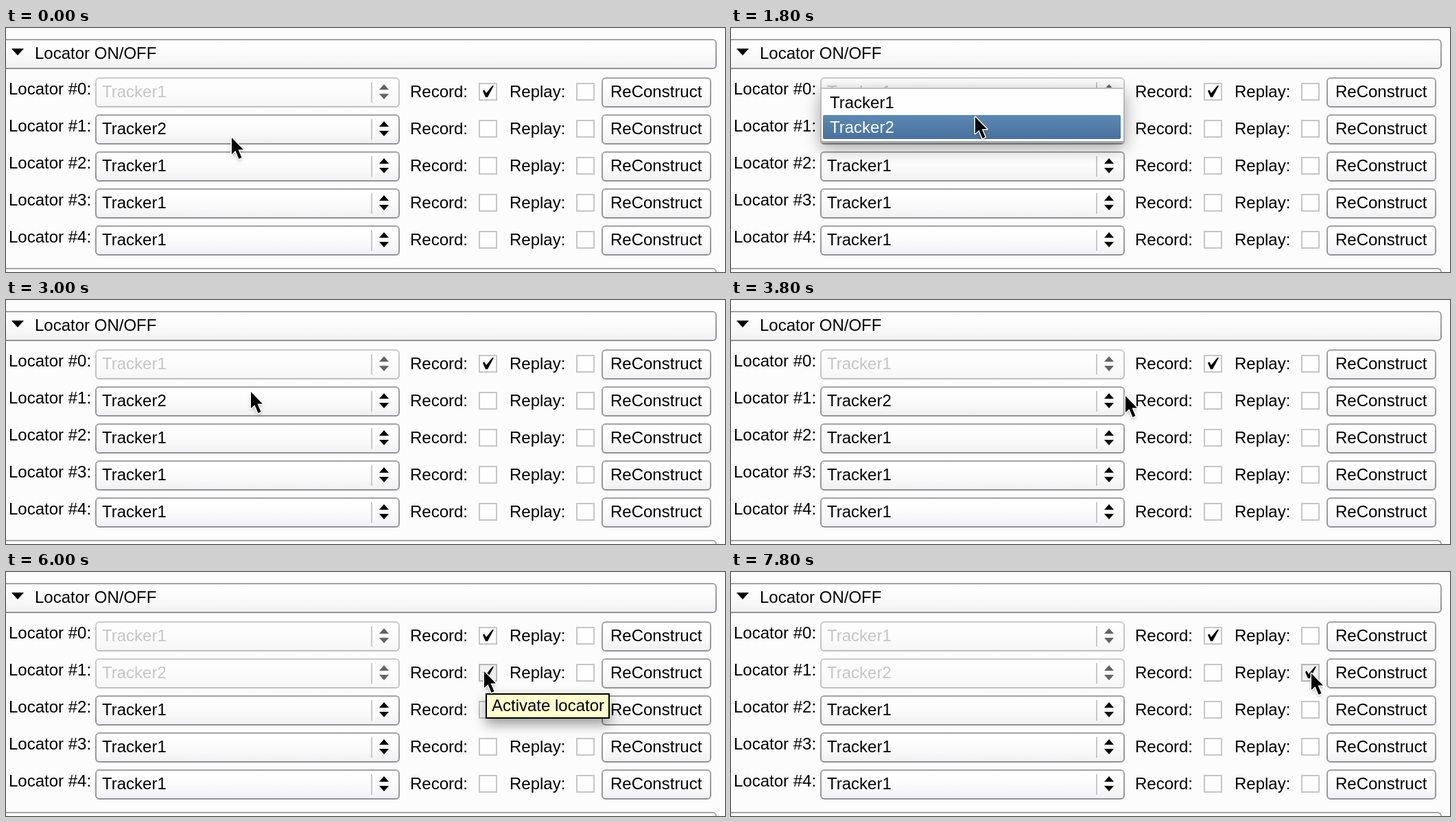
Write an HTML page with a canvas that moves like this. It is 1048 px wide and 356 px high and loops after 8000 ms.

```html
<!DOCTYPE html>
<html lang="en">
<head>
<meta charset="utf-8">
<title>Locator panel</title>
<style>
  html, body { margin: 0; width: 100%; height: 100%; overflow: hidden; background: #fcfcfc; }
  canvas { display: block; width: 100%; height: 100%; }
</style>
</head>
<body>
<canvas id="stage" width="1048" height="356"></canvas>
<script>
const ctx = document.getElementById('stage').getContext('2d');
const LOOP = 8000, STEP = 200, ROW_HEIGHT = 54;
const PAPER = '#fcfcfc';

// Pointer path: time, x, y
const path = [
  [0, 329, 160], [200, 329, 160], [800, 351, 143], [1200, 354, 138],
  [1600, 355, 135], [2200, 360, 114], [2400, 360, 114], [2800, 357, 134],
  [3200, 357, 134], [4200, 694, 144], [4800, 694, 144], [5200, 697, 145],
  [6400, 697, 145], [7400, 846, 148], [8000, 846, 148]
];

function pointerAt(time) {
  const i = Math.max(1, path.findIndex(p => p[0] >= time));
  const [t0, x0, y0] = path[i - 1], [t1, x1, y1] = path[i];
  const u = (time - t0) / (t1 - t0), ease = u * u * (3 - 2 * u);
  return { x: Math.round(x0 + (x1 - x0) * ease), y: Math.round(y0 + (y1 - y0) * ease) };
}

const between = (time, from, to) => time >= from && time < to;

function text(str, x, y, color = '#000') {
  ctx.fillStyle = color;
  ctx.fillText(str, x, y);
}

function shape(points, color) {
  ctx.beginPath();
  points.forEach(([x, y]) => ctx.lineTo(x, y));
  ctx.closePath();
  ctx.fillStyle = color;
  ctx.fill();
}

function gradient(y, h, ...colors) {
  const g = ctx.createLinearGradient(0, y, 0, y + h);
  colors.forEach((c, i) => g.addColorStop(i / (colors.length - 1), c));
  return g;
}

function withShadow(color, blur, dy, draw) {
  ctx.save();
  ctx.shadowColor = color;
  ctx.shadowBlur = blur;
  ctx.shadowOffsetY = dy;
  draw();
  ctx.restore();
}

function bevel(x, y, w, h) {
  ctx.beginPath();
  ctx.roundRect(x + 1, y + 1, w - 2, h - 2, 5);
  ctx.fillStyle = gradient(y, h, '#ffffff', '#fdfdfd', '#f8f8f8', '#efefef');
  ctx.fill();
  ctx.lineWidth = 2;
  ctx.strokeStyle = gradient(y, h, '#a4a4a8', '#929298');
  ctx.stroke();
}

function combo(y, label, disabled) {
  ctx.globalAlpha = disabled ? 0.55 : 1;
  bevel(130, y, 444, 44);
  ctx.globalAlpha = 1;
  ctx.fillStyle = '#c8c8c8';
  ctx.fillRect(532, y + 7, 2, 30);
  const ink = disabled ? '#646464' : '#000';
  shape([[544, y + 18], [551, y + 10], [558, y + 18]], ink);
  shape([[544, y + 24], [551, y + 32], [558, y + 24]], ink);
  text(label, 140, y + 29, disabled ? '#c6c6c6' : '#000');
}

function checkbox(x, y, checked, hovered) {
  ctx.fillStyle = hovered ? '#f0f0f0' : '#fefefe';
  ctx.fillRect(x, y, 27, 26);
  ctx.lineWidth = 2;
  ctx.strokeStyle = hovered ? '#b6b6b6' : '#c6c6c6';
  ctx.strokeRect(x + 1, y + 1, 25, 24);
  if (checked) {
    shape([[x + 6, y + 12], [x + 8, y + 10], [x + 11, y + 15], [x + 20, y + 4],
      [x + 22, y + 4], [x + 13, y + 21], [x + 10, y + 21]], '#000');
  }
}

function row(index, state) {
  const y = 72 + index * ROW_HEIGHT;
  const active = index === 1;
  const record = index === 0 || active && state.record;
  const replay = active && state.replay;
  const hover = x => active && between(state.pointer.x, x, x + 27);
  text(`Locator #${index}:`, 4, y + 25);
  combo(y, active ? 'Tracker2' : 'Tracker1', record || replay);
  text('Record:', 589, y + 29);
  checkbox(689, y + 8, record, hover(689));
  text('Replay:', 734, y + 29);
  checkbox(831, y + 8, replay, hover(831));
  bevel(868, y, 160, 44);
  text('ReConstruct', 881, y + 29);
}

function popup(selected) {
  withShadow('rgba(0,0,0,.36)', 24, 7, () => {
    ctx.fillStyle = gradient(87, 81, '#c0c0c0', '#a8a8a8');
    ctx.beginPath();
    ctx.roundRect(130, 87, 444, 81, 3);
    ctx.fill();
  });
  ctx.fillStyle = '#fefefe';
  ctx.fillRect(132, 89, 440, 76);
  ['Tracker1', 'Tracker2'].forEach((label, i) => {
    const y = 91 + i * 36;
    if (i === selected) {
      ctx.beginPath();
      ctx.roundRect(134, y, 434, 35, 2);
      ctx.fillStyle = gradient(y, 35, '#5c89b4', '#48719c');
      ctx.fill();
    }
    text(label, 144, y + 26, i === selected ? '#fff' : '#000');
  });
}

function tooltip() {
  withShadow('rgba(0,0,0,.4)', 18, 8, () => {
    ctx.fillStyle = '#000';
    ctx.fillRect(699, 177, 181, 37);
  });
  ctx.fillStyle = '#ffffcc';
  ctx.fillRect(701, 179, 177, 33);
  text('Activate locator', 708, 203);
}

function pointer({ x, y }) {
  ctx.save();
  ctx.translate(x, y);
  const arrow = [[0, 0], [0, 24], [5.5, 19], [10.5, 31], [14.5, 29], [9.5, 17.5], [17, 17.5]];
  withShadow('rgba(0,0,0,.35)', 5, 3, () => shape(arrow, '#000'));
  ctx.lineWidth = 3;
  ctx.lineJoin = 'round';
  ctx.strokeStyle = '#fff';
  ctx.stroke();
  shape(arrow, '#000');
  ctx.restore();
}

function render(time) {
  const state = {
    pointer: pointerAt(time),
    record: between(time, 4400, 6600),
    replay: time >= 7600
  };
  ctx.font = '24px "Liberation Sans", Arial, sans-serif';
  ctx.fillStyle = PAPER;
  ctx.fillRect(0, 0, 1048, 356);
  bevel(-10, 16, 1046, 44);
  shape([[8, 30], [26, 30], [17, 40]], '#000');
  text('Locator ON/OFF', 42, 45);
  for (let i = 0; i < 5; i++) row(i, state);
  bevel(-10, 350, 1046, 44);
  if (between(time, 800, 2800)) popup(state.pointer.y < 127 ? 0 : 1);
  if (between(time, 5400, 6400)) tooltip();
  pointer(state.pointer);
}

function tick() {
  const time = performance.now() % LOOP;
  render(Math.floor(time / STEP) * STEP);
  requestAnimationFrame(tick);
}
tick();
</script>
</body>
</html>
```
